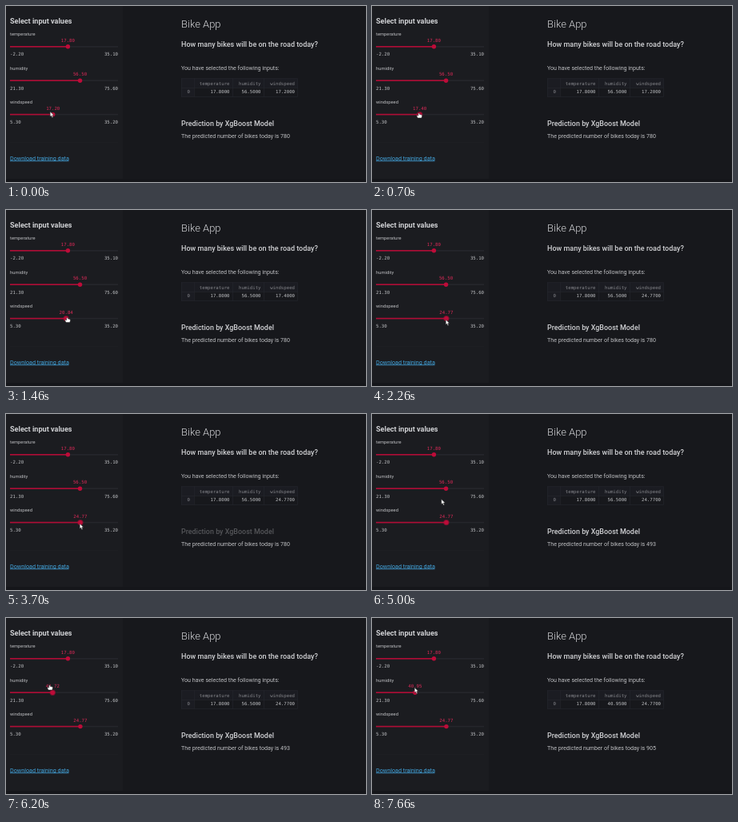
These frames come from a looping animation (450 by 220 pixels, 8000 ms). An HTML page:

```html
<!DOCTYPE html>
<html lang="en">
<head>
<meta charset="utf-8">
<title>Bike App</title>
<style>
  html, body { margin: 0; width: 100%; height: 100%; overflow: hidden; background: #17181c; }
  svg { display: block; width: 450px; height: 220px; }
  text { font-family: Roboto, "Open Sans", sans-serif; fill: #bfc0c3; white-space: pre; }
  .title { fill: #d0d1d4; }
  .mono { font-family: "DejaVu Sans Mono", monospace; font-size: 5.7px; }
  .value { fill: #dc2a58; text-anchor: middle; }
  .end { text-anchor: end; }
  .head { fill: #85868b; }
  .link { fill: #43a5dd; }
</style>
</head>
<body>
<svg id="stage" viewBox="0 0 450 220" xmlns="http://www.w3.org/2000/svg"></svg>
<script>
const LOOP = 8000;
const LEFT = 5, WIDTH = 135;
const stage = document.getElementById('stage');

function add(tag, attrs) {
  const el = document.createElementNS('http://www.w3.org/2000/svg', tag);
  set(el, attrs);
  stage.append(el);
  return el;
}
function set(el, attrs) {
  for (const key in attrs) el.setAttribute(key, attrs[key]);
}
const rect = (x, y, width, height, fill) => add('rect', { x, y, width, height, fill });
function text(str, x, y, attrs) {
  const el = add('text', { x, y, ...attrs });
  el.textContent = str;
  return el;
}
const write = (el, str) => { if (el.textContent !== str) el.textContent = str; };

// Background
rect(0, 0, 450, 220, '#17181c');
rect(0, 0, 146, 220, '#1b1c20');
rect(0, 216, 450, 4, '#15161a');

// Sidebar
text('Select input values', 5, 22, { class: 'title', 'font-size': 9.1, 'font-weight': 700 });

function slider(name, min, max, y) {
  text(name, 5, y - 13.6, { 'font-size': 5.8 });
  rect(LEFT, y - 0.8, WIDTH, 1.6, '#25262b');
  const bar = rect(LEFT, y - 0.8, 0, 1.6, '#b00c35');
  const glow = add('circle', { cy: y, r: 3.7, fill: '#b00c35', opacity: 0.6 });
  const thumb = add('circle', { cy: y, r: 2.7, fill: '#bd0c39' });
  const label = text('', 0, y - 5.8, { class: 'mono value' });
  text(min.toFixed(2), LEFT, y + 11.5, { class: 'mono' });
  text(max.toFixed(2), LEFT + WIDTH, y + 11.5, { class: 'mono end' });
  return (value, focus) => {
    const x = LEFT + WIDTH * (value - min) / (max - min);
    set(bar, { width: x - LEFT });
    set(thumb, { cx: x });
    set(glow, { cx: x, visibility: focus ? 'visible' : 'hidden' });
    set(label, { x });
    write(label, value.toFixed(2));
  };
}
const setTemperature = slider('temperature', -2.2, 35.1, 50.8);
const setHumidity = slider('humidity', 21.3, 75.6, 93.2);
const setWind = slider('windspeed', 5.3, 35.2, 135.6);

rect(LEFT, 170, WIDTH, 0.6, '#1f2024');
text('Download training data', 5, 193, { class: 'link', 'font-size': 7.2 });
rect(5, 193.4, 73.5, 0.8, '#43a5dd');

// Main column
text('Bike App', 219, 27, { class: 'title', 'font-size': 13, 'font-weight': 300 });
text('How many bikes will be on the road today?', 219, 51,
  { class: 'title', 'font-size': 9, 'font-weight': 500 });
text('You have selected the following inputs:', 219, 79.8, { 'font-size': 7.1 });
const heading = text('Prediction by XgBoost Model', 219, 149.6,
  { class: 'title', 'font-size': 8.95, 'font-weight': 500 });
const result = text('', 219, 164.6, { 'font-size': 7.1 });

// Table
rect(219, 90.5, 145.5, 23, '#1b1c22');
rect(235.5, 102, 129, 11.5, '#17181c');
const line = '#26272e';
for (const y of [90.5, 102, 113]) rect(219, y, 145.5, 0.6, line);
for (const x of [219, 235.5, 283, 322, 364]) rect(x, 90.5, 0.6, 23, line);
text('0', 226.5, 109, { class: 'mono head' });
const cells = [['temperature', 279.5], ['humidity', 318.5], ['windspeed', 361]].map(([name, x]) => {
  text(name, x, 98.6, { class: 'mono end head' });
  return text('', x, 109, { class: 'mono end' });
});

// Pointers
const ink = { fill: '#fff', stroke: '#222', 'stroke-width': 0.5, 'stroke-linejoin': 'round' };
const arrow = add('path', { d: 'M-.8 0V6.3L.6 5.1L1.7 7.6L2.9 7.1L1.8 4.7L3.8 4.5Z', ...ink });
const hand = add('path', {
  d: 'M-1.3-2.6Q-.4-3.4 .4-2.6V-1.5L2.9-.9Q3.6-.4 3.4 .8L2.8 3H-2L-3.2.8Q-3.4-.4-2.2-.2L-1.3.2Z', ...ink
});

const clamp = u => Math.max(0, Math.min(1, u));
const phase = (t, from, to) => clamp((t - from) / (to - from));
const easeOut = (u, power) => 1 - (1 - u) ** power;
const mix = (a, b, u) => a + (b - a) * u;

// Points are [time, x, y]
function along(points, t) {
  let i = 1;
  while (i < points.length - 1 && t > points[i][0]) i++;
  const a = points[i - 1], b = points[i], u = phase(t, a[0], b[0]);
  return [mix(a[1], b[1], u), mix(a[2], b[2], u)];
}

const path = [
  [0, 56, 132], [300, 57.5, 134], [460, 59, 137], [1300, 59.5, 137],
  [1460, 77, 137.5], [2000, 93, 137], [4700, 93, 137], [4850, 89, 120],
  [5000, 87.5, 106.5], [5260, 91.5, 93], [5640, 92, 95.5],
  [6200, 55, 87], [6400, 54, 87], [8000, 54, 87]
];

function draw(t) {
  const drag = easeOut(phase(t, 1300, 2000), 2.41);
  const wind = t < 480 ? 17.2 : mix(17.4, 24.77, drag);
  const humidity = mix(56.5, 40.95, easeOut(phase(t, 5640, 6400), 1.62));
  setTemperature(17.8, false);
  setHumidity(humidity, t >= 5640 && t < 6840);
  setWind(wind, t >= 460 && t < 5640);

  const sent = [17.8, t < 6840 ? 56.5 : 40.95, t < 1340 ? 17.2 : t < 2140 ? 17.4 : 24.77];
  cells.forEach((cell, i) => write(cell, sent[i].toFixed(4)));

  // The heading dims while the model is running
  const wait = t < 4200 ? phase(t, 2640, 3700) : t < 7640 ? phase(t, 7380, 8440) : 0;
  set(heading, { opacity: 1 - 0.67 * wait ** 1.8 });
  const count = t < 4200 ? 780 : t < 7600 ? 493 : 905;
  write(result, `The predicted number of bikes today is ${count}`);

  const grab = (t >= 460 && t < 2140) || (t >= 5400 && t < 6840);
  const transform = `translate(${along(path, t)})`;
  set(arrow, { transform, visibility: grab ? 'hidden' : 'visible' });
  set(hand, { transform, visibility: grab ? 'visible' : 'hidden' });
}

const start = performance.now();
function tick() {
  draw((performance.now() - start) % LOOP);
  requestAnimationFrame(tick);
}
tick();
</script>
</body>
</html>
```
